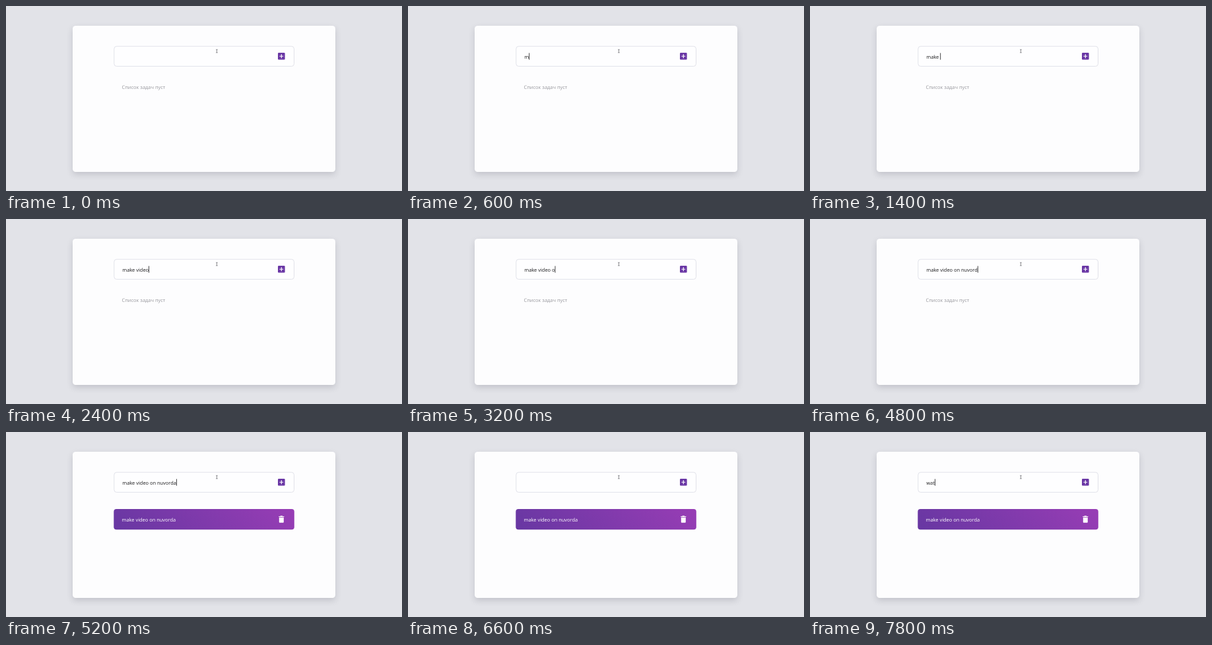
These frames come from a looping animation (600 by 281 pixels, 8000 ms). An HTML page:

```html
<!DOCTYPE html>
<html lang="ru">
<head>
<meta charset="utf-8">
<title>Список задач</title>
<style>
  html, body { margin: 0; width: 100%; height: 100%; overflow: hidden; background: #e2e3e8; }
  .card {
    position: absolute; left: 101px; top: 29.5px; width: 398px; height: 222.5px;
    border-radius: 4.5px; background: #fdfdfe;
    box-shadow: 0 4px 10px rgba(40, 40, 60, .17);
  }
  svg { position: absolute; left: 0; top: 0; display: block; }
  text {
    font: 7.44px "Open Sans", "Noto Sans", sans-serif;
    text-rendering: geometricPrecision;
    white-space: pre;
  }
  .field { fill: #fefeff; stroke: #e2e3ea; stroke-width: 1; }
  .empty { fill: #98989d; }
  .typed { fill: #1b1b1d; }
  .task text, .task path { fill: #fff; }
  .beam { fill: none; stroke: #77777c; stroke-width: .8; }

  /* The list swaps its placeholder for the task when the entry is sent. */
  .empty { animation: before 8s step-end infinite; }
  .task { animation: after 8s step-end infinite; }
  @keyframes before { 0% { visibility: visible } 65%, 100% { visibility: hidden } }
  @keyframes after { 0% { visibility: hidden } 65%, 100% { visibility: visible } }
</style>
</head>
<body>
<div class="card"></div>
<svg width="600" height="281" viewBox="0 0 600 281">
  <defs>
    <linearGradient id="violet" gradientUnits="userSpaceOnUse" x1="224" y1="208.5" x2="376" y2="56.5">
      <stop offset="0" stop-color="#6737a2"/>
      <stop offset="1" stop-color="#983db5"/>
    </linearGradient>
  </defs>

  <rect class="field" x="163.8" y="61.2" width="272.7" height="30.4" rx="4"/>
  <text class="typed" id="typed" x="176.3" y="79.6"></text>
  <rect id="caret" y="71.4" width=".8" height="10.2" fill="#1b1b1d"/>

  <rect x="412" y="71" width="10.6" height="10.5" rx="1.2" fill="#6a37a5"/>
  <path d="M414.4 76.25h5.8M417.3 73.35v5.8" stroke="#fff" stroke-width="1.2"/>

  <text class="empty" x="175.5" y="126">Список задач пуст</text>

  <g class="task">
    <rect x="163.3" y="117.1" width="273.5" height="31.2" rx="4" fill="url(#violet)"/>
    <text x="175.5" y="135.9">make video on nuvorda</text>
    <path transform="translate(410.3 125.6) scale(.583)"
      d="M6 19c0 1.1.9 2 2 2h8c1.1 0 2-.9 2-2V7H6zM19 4h-3.5l-1-1h-5l-1 1H5v2h14z"/>
  </g>

  <path class="beam" d="M318 66.2h2.8M319.4 66.2v4.6M318 70.8h2.8"/>
</svg>
<script>
  const LOOP = 8000;
  const task = "make video on nuvorda";
  const next = "watch";

  // Each step: start in ms, entry, letters typed, caret shown
  const steps = [
    [0, task, 0, false],
    [400, task, 1, true], [600, task, 2, true], [800, task, 4, true], [1000, task, 5, true],
    [1400, task, 5, false],
    [1600, task, 6, true], [1800, task, 7, true], [2000, task, 9, true],
    [2200, task, 10, true], [2400, task, 11, true],
    [2800, task, 11, false],
    ...Array.from({ length: 10 }, (_, i) => [3000 + i * 200, task, 12 + i, true]),
    [5200, next, 0, false], [5600, next, 0, true], [6200, next, 0, false], [6600, next, 0, true],
    [7000, next, 1, true], [7200, next, 2, true], [7400, next, 3, true], [7800, next, 5, true]
  ];

  const typed = document.getElementById("typed");
  const caret = document.getElementById("caret");
  const clock = document.querySelector(".task").getAnimations()[0];
  let shown = null;

  function draw() {
    // Share the CSS clock so the text and the list change together.
    const now = clock && clock.currentTime !== null ? clock.currentTime : performance.now();
    const t = now % LOOP;
    const step = steps.findLast(s => s[0] <= t + 0.5) || steps[0];
    if (step !== shown) {
      const [, entry, count, lit] = shown = step;
      typed.textContent = entry.slice(0, count);
      caret.setAttribute("x", 176.4 + (count ? typed.getComputedTextLength() : 0));
      caret.setAttribute("visibility", lit ? "visible" : "hidden");
    }
    requestAnimationFrame(draw);
  }
  draw();
</script>
</body>
</html>
```
